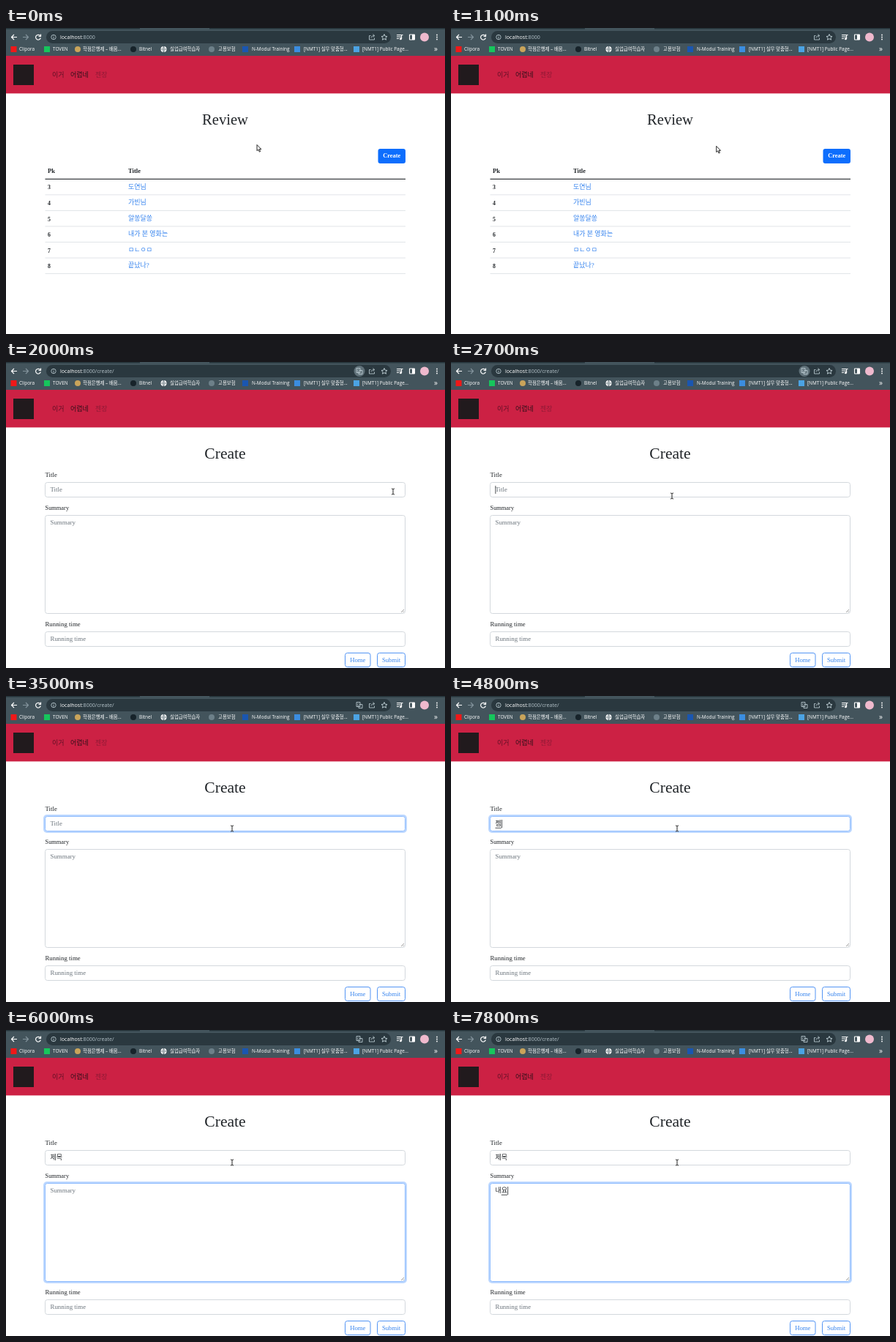
An HTML page with a canvas that plays this animation: 600x418 px, repeating every 8 s.

```html
<!DOCTYPE html>
<html lang="ko">
<head>
<meta charset="utf-8">
<title>Review</title>
<style>
html, body { margin: 0; width: 100%; height: 100%; overflow: hidden; background: #fff; }
canvas { display: block; width: 600px; height: 418px; }
</style>
</head>
<body>
<canvas id="stage"></canvas>
<script>
const W = 600, H = 418, LOOP = 8000;
const SERIF = "'Liberation Serif', 'Noto Sans CJK KR', 'Noto Sans CJK', serif";
const SANS = "'Open Sans', 'Noto Sans CJK KR', 'Noto Sans CJK', sans-serif";
const INK = '#212529', BLUE = '#0d6efd', LINK = '#3583ee', MUTED = '#6c757d';
const PALE = '#c6d6dc';

const canvas = document.getElementById('stage');
const dpr = window.devicePixelRatio || 1;
canvas.width = W * dpr;
canvas.height = H * dpr;
const c = canvas.getContext('2d');

const clamp = v => Math.max(0, Math.min(1, v));
const ramp = (t, a, b) => clamp((t - a) / (b - a));
const ease = p => p * p * (3 - 2 * p);
const mix = (a, b, p) => a + (b - a) * p;
const within = (t, spans) => spans.some(([a, b]) => t >= a && t < b);
const latest = (t, steps) => steps.reduce((now, [at, s]) => t >= at ? s : now, '');

function text(s, x, y, size, color, { font = SERIF, weight = 400, align = 'left' } = {}) {
  c.font = `${weight} ${size}px ${font}`;
  c.textAlign = align;
  c.fillStyle = color;
  c.fillText(s, x, y);
  return c.measureText(s).width;
}
function rect(x, y, w, h, color) {
  c.fillStyle = color;
  c.fillRect(x, y, w, h);
}
function round(x, y, w, h, r, fill, stroke, line = 1) {
  c.beginPath();
  c.roundRect(x, y, w, h, r);
  if (fill) { c.fillStyle = fill; c.fill(); }
  if (stroke) { c.strokeStyle = stroke; c.lineWidth = line; c.stroke(); }
}
function disc(x, y, r, color) {
  c.beginPath();
  c.arc(x, y, r, 0, 7);
  c.fillStyle = color;
  c.fill();
}
function path(d, x, y, stroke, fill, line = 1) {
  const p = new Path2D(d);
  c.save();
  c.translate(x, y);
  c.lineJoin = 'round';
  if (fill) { c.fillStyle = fill; c.fill(p); }
  if (stroke) { c.strokeStyle = stroke; c.lineWidth = line; c.stroke(p); }
  c.restore();
}

const bookmarks = [
  [10.5, 18, 'Clipora', '#f01818', 'box'],
  [56, 64, 'TOVEN', '#16c65c', 'box'],
  [98, 105, '학점은행제 – 배움...', '#c9a45a', 'dot'],
  [174, 182, 'Bitnel', '#17232a', 'dot'],
  [215.5, 224, '실업급여학습자', '', 'globe'],
  [281, 290, '고용보험', '#6d8089', 'dot'],
  [327, 336, 'N-Modul Training', '#1a56b0', 'box'],
  [398, 407, '[NMT1] 실무 맞춤형...', '#3b8de0', 'box'],
  [479, 487, '[NMT1] Public Page...', '#4ba3e3', 'box']
];

function browser(t, creating) {
  rect(0, 0, W, 39, '#43545c');
  rect(0, 0, 183, 1.5, '#26343b');
  rect(278, 0, 322, 1.5, '#26343b');
  round(55, 4, 471, 17, 8.5, '#2a383f');

  path('M4 0H-3.5M0-3.5L-3.5 0L0 3.5', 11, 12.5, '#fff', null, 1.2);
  path('M-4 0H3.5M0-3.5L3.5 0L0 3.5', 27, 12.5, '#83949c', null, 1.2);
  path('M2.6-2A3.4 3.4 0 1 0 3.3 1M3.5-4V-1H.5', 44, 12.5, '#fff', null, 1.2);
  path('M3.2 0A3.2 3.2 0 1 1-3.2 0A3.2 3.2 0 1 1 3.2 0M0-.6V2M0-2V-1.2', 65, 12.5, PALE, null, .8);

  const w = text('localhost', 74, 15, 7.1, '#fff', { font: SANS });
  text(':8000' + (creating ? '/create/' : ''), 74 + w, 15, 7.1, '#b4c2c9', { font: SANS });

  if (creating) {
    const glow = 1 - ramp(t, 2750, 2950);
    if (glow > 0) disc(483, 12.5, 7.5, `rgba(150,170,180,${.5 * glow})`);
    path('M-4-4H1V2H-4ZM0-1H4V4H-1V2', 483, 12.5, PALE, null, .8);
    text('G', 481.4, 14, 4.5, PALE, { font: SANS, align: 'center' });
  }
  path('M-1.5-2H-3.5V3.5H3.5V1M-1 1C-1-1 1-2 3-2M1.5-4L3.8-2L1.5 0', 500, 12.5, PALE, null, .8);
  path('M0-4L1.2-1.3L4-1L1.9.9L2.5 3.7L0 2.2L-2.5 3.7L-1.9.9L-4-1L-1.2-1.3Z', 517, 12.5, PALE, null, .9);
  path('M-4-3H2M-4-.5H2M-4 2H-1M2.6 2.5V-3H4.5', 538, 12.5, '#fff', null, 1.1);
  disc(539.4, 14.8, 1.5, '#fff');
  round(551.5, 9, 7, 7, .5, null, '#fff', 1.1);
  rect(555, 9, 3.5, 7, '#fff');
  disc(572, 12.5, 6, '#efb9cd');
  for (const y of [9.5, 12.5, 15.5]) disc(589, y, .9, '#fff');

  for (const [ix, tx, label, color, kind] of bookmarks) {
    if (kind === 'box') rect(ix - 4, 25, 8, 8, color);
    else if (kind === 'dot') disc(ix, 29, 4, color);
    else {
      disc(ix, 29, 4, '#fff');
      path('M-4 0H4M0-4V4M0-4Q-3.6 0 0 4Q3.6 0 0-4', ix, 29, '#53656d', null, .6);
    }
    text(label, tx, 31.4, 6.4, '#fff', { font: SANS });
  }
  text('»', 585, 32, 10, '#fff', { font: SANS });
}

function navbar() {
  rect(0, 38, W, 51.4, '#cc2144');
  rect(10, 50, 28, 28, '#211a1d');
  text('이거', 63, 66.5, 9, '#5f1026');
  text('어렵네', 88, 66.5, 9, '#30101a');
  text('젠장', 122, 66.5, 9, '#921a36');
}

const rows = [
  ['3', '도연님'], ['4', '가빈님'], ['5', '알쏭달쏭'],
  ['6', '내가 본 영화는'], ['7', 'ㅁㄴㅇㅁ'], ['8', '끝났나?']
];

function listPage(hover) {
  text('Review', 299.5, 132, 20.6, INK, { align: 'center' });
  const shade = `rgb(${mix(13, 11, hover)},${mix(110, 94, hover)},${mix(253, 215, hover)})`;
  round(508.5, 165, 37.5, 20, 3, shade);
  text('Create', 527.2, 177.3, 8.4, '#fff', { weight: 700, align: 'center' });
  text('Pk', 57, 197.8, 8.6, INK, { weight: 700 });
  text('Title', 167, 197.8, 8.6, INK, { weight: 700 });
  rect(53.5, 205.8, 492.5, 1.1, INK);
  rows.forEach(([pk, title], i) => {
    const y = 219.6 + i * 21.55;
    text(pk, 57, y + .8, 7.8, INK, { weight: 700 });
    text(title, 167, y, 9, LINK);
    rect(53.5, y + 7.8, 492.5, .9, '#dee2e6');
  });
}

function field(y, h, ring) {
  if (ring > 0) round(51, y - 2, 497, h + 4, 5, `rgba(13,110,253,${.27 * ring})`);
  round(53.5, y + .5, 492, h - 1, 3, '#fff', ring > .5 ? '#86b7fe' : '#ced4da', .9);
}

// Value with the last syllable underlined while it is being composed.
function entry(value, hint, base, composing, caret) {
  let x = 60.5;
  if (!value) text(hint, x, base, 8.9, MUTED);
  else {
    const head = text(value.slice(0, -1), x, base, 9, INK);
    const tail = text(value.slice(-1), x + head, base, 9, INK);
    if (composing) rect(x + head, base + 2.8, tail, .8, INK);
    x += head + tail + .3;
  }
  if (caret) rect(x, base - 8, .8, 11, INK);
}

function outlineButton(label, x, w) {
  round(x + .5, 397.5, w - 1, 19, 3, '#fff', '#3f88f3', .9);
  text(label, x + w / 2, 410, 8.7, LINK, { align: 'center' });
}

const titleKeys = [[4500, 'ㅈ'], [4600, '제'], [4800, '젬'], [4900, '제모'], [5000, '제목']];
const bodyKeys = [[7300, 'ㄴ'], [7400, '내'], [7600, '냉'], [7700, '내요']];
const titleCaret = [[2650, 3250], [3800, 4150], [4500, 5400]];
const bodyCaret = [[5400, 5950], [6400, 6900], [7300, 8000]];

function formPage(t) {
  const swap = ramp(t, 5400, 5550);
  text('Create', 299.5, 132, 21.6, INK, { align: 'center' });
  text('Title', 53.5, 156.6, 8.8, INK);
  text('Summary', 53.5, 201.8, 8.4, INK);
  text('Running time', 53.5, 360.5, 8.8, INK);

  field(164, 21, ramp(t, 2720, 2900) * (1 - swap));
  entry(latest(t, titleKeys), 'Title', 177, t < 5400, within(t, titleCaret));

  field(209, 135, swap);
  entry(latest(t, bodyKeys), 'Summary', 222, true, within(t, bodyCaret));
  path('M0 4L4 0M2.4 4L4 2.4', 540, 338, '#777', null, .7);

  field(368, 21, 0);
  entry('', 'Running time', 381, false, false);
  outlineButton('Home', 463, 35.5);
  outlineButton('Submit', 507, 39);
}

function pointer(t, creating, overButton) {
  const go = ease(ramp(t, 1000, 1500));
  const back = ease(ramp(t, 2100, 2700));
  const settle = ease(ramp(t, 2750, 2950));
  const x = mix(343, 529, go) + back * -227 + settle * 7;
  const y = mix(159.5, 177, go) + back * 6 - settle * 2;
  if (creating) {
    const beam = 'M-2-4Q-.5-4 0-3Q.5-4 2-4M0-3V3M-2 4Q-.5 4 0 3Q.5 4 2 4';
    path(beam, x, y, '#222', null, 1);
  } else if (overButton) {
    path('M-.9 0Q0-1.2.9 0V3.6L3.5 4.3Q4.6 4.7 4.5 6L3.7 10H-1.5L-4 6.3Q-4.2 5-2.8 5L-.9 6.3Z', x, y, '#111', '#fff', .9);
  } else {
    path('M0 0V8.2L1.9 6.5L3.3 9.7L4.7 9L3.3 6H5.8Z', x, y, '#111', '#fff', .9);
  }
}

function draw(t) {
  const creating = t >= 2000;
  const overButton = t >= 1390;
  c.setTransform(dpr, 0, 0, dpr, 0, 0);
  rect(0, 0, W, H, '#fff');
  browser(t, creating);
  navbar();
  if (creating) formPage(t);
  else listPage(ramp(t, 1390, 1540));
  pointer(t, creating, overButton);
}

const start = performance.now();
function tick() {
  draw((performance.now() - start) % LOOP);
  requestAnimationFrame(tick);
}
tick();
</script>
</body>
</html>
```
